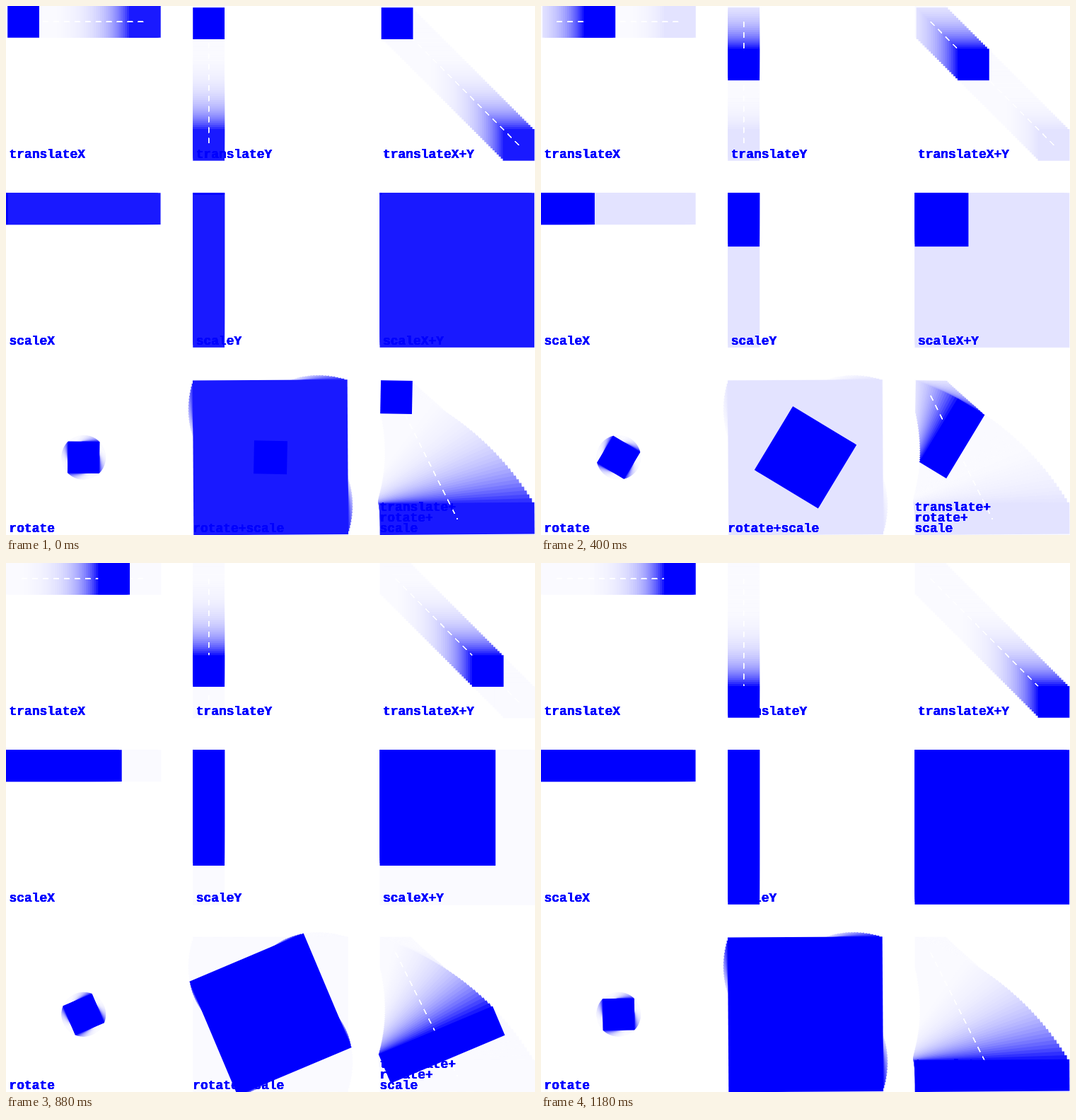
Recreate the animation shown at these times as an HTML page with a canvas. Size 748 px wide and 748 px high, loop 1200 ms.

```html
<!DOCTYPE html>
<html lang="en">
<head>
<meta charset="utf-8">
<title>Transforms</title>
<style>
  html, body { margin: 0; width: 100%; height: 100%; overflow: hidden; background: #fff; }
  canvas { display: block; width: 748px; height: 748px; }
</style>
</head>
<body>
<canvas id="stage" width="748" height="748"></canvas>
<script>
const ctx = document.getElementById('stage').getContext('2d');

// All lengths are in grid units; the 3 x 3 grid spans 334 of them.
const UNIT = 748 / 334;
const CELL = 98, PITCH = 118, SIDE = 20;
const TRAVEL = CELL - SIDE, HALF = SIDE / 2, MID = CELL / 2;
const STEPS = 60, STEP_MS = 20, PHASE = 0.75;
const KEEP = 0.9, PALEST = 250;
const REDRAWS = 6; // repeated strokes harden the soft edges

const grow = p => SIDE + TRAVEL * p;
const slide = p => HALF + TRAVEL * p;
const stretch = p => CELL * p;
const quarter = p => p * Math.PI / 2;

// pose(p) gives [centre x, centre y, width, height, angle]
const cells = [
  { label: ['translateX'], path: [HALF, HALF, CELL - HALF, HALF],
    pose: p => [slide(p), HALF, SIDE, SIDE, 0] },
  { label: ['translateY'], path: [HALF, HALF, HALF, CELL - HALF],
    pose: p => [HALF, slide(p), SIDE, SIDE, 0] },
  { label: ['translateX+Y'], path: [HALF, HALF, CELL - HALF, CELL - HALF],
    pose: p => [slide(p), slide(p), SIDE, SIDE, 0] },
  { label: ['scaleX'],
    pose: p => [stretch(p) / 2, HALF, stretch(p), SIDE, 0] },
  { label: ['scaleY'],
    pose: p => [HALF, stretch(p) / 2, SIDE, stretch(p), 0] },
  { label: ['scaleX+Y'],
    pose: p => [stretch(p) / 2, stretch(p) / 2, stretch(p), stretch(p), 0] },
  { label: ['rotate'],
    pose: p => [MID, MID, SIDE, SIDE, quarter(p)] },
  { label: ['rotate+scale'], inset: 0,
    pose: p => [MID, MID, grow(p), grow(p), quarter(p)] },
  { label: ['translate+', 'rotate+', 'scale'], inset: 0,
    path: [HALF, HALF, MID, CELL - HALF],
    pose: p => [HALF + (MID - HALF) * p, slide(p), SIDE, grow(p), quarter(p)] }
];

function eachCell(draw) {
  cells.forEach((cell, i) => {
    ctx.save();
    ctx.translate(i % 3 * PITCH, Math.floor(i / 3) * PITCH);
    draw(cell);
    ctx.restore();
  });
}

function drawShapes(p, age) {
  const level = Math.min(PALEST, Math.round(255 * (1 - KEEP ** age)));
  ctx.fillStyle = `rgb(${level},${level},255)`;
  eachCell(({ pose }) => {
    const [x, y, w, h, angle] = pose(p);
    ctx.translate(x, y);
    ctx.rotate(angle);
    ctx.fillRect(-w / 2, -h / 2, w, h);
  });
}

function drawGuide({ path, label, inset = 2 }) {
  for (let n = 0; n < REDRAWS; n++) {
    if (path) {
      ctx.beginPath();
      ctx.moveTo(path[0], path[1]);
      ctx.lineTo(path[2], path[3]);
      ctx.stroke();
    }
    label.forEach((line, i) =>
      ctx.fillText(line, inset, 96 - (label.length - 1 - i) * 6.7));
  }
}

function render(step) {
  ctx.setTransform(1, 0, 0, 1, 0, 0);
  ctx.fillStyle = '#fff';
  ctx.fillRect(0, 0, 748, 748);
  ctx.scale(UNIT, UNIT);

  const progress = i => ((i + STEPS) % STEPS + PHASE) / STEPS;
  drawShapes(0, Infinity);
  drawShapes(1, Infinity);
  for (let age = STEPS; age > 0; age--) drawShapes(progress(step - age), age);

  ctx.strokeStyle = '#fff';
  ctx.lineWidth = 0.5;
  ctx.setLineDash([10 / 3, 10 / 3]);
  ctx.fillStyle = '#00f';
  ctx.font = 'bold 8px "Courier New", Courier, "Liberation Mono", monospace';
  eachCell(drawGuide);
  drawShapes(progress(step), 0);
}

let shown = -1;
function tick() {
  const step = Math.floor(performance.now() / STEP_MS) % STEPS;
  if (step !== shown) render(shown = step);
  requestAnimationFrame(tick);
}
tick();
</script>
</body>
</html>
```
